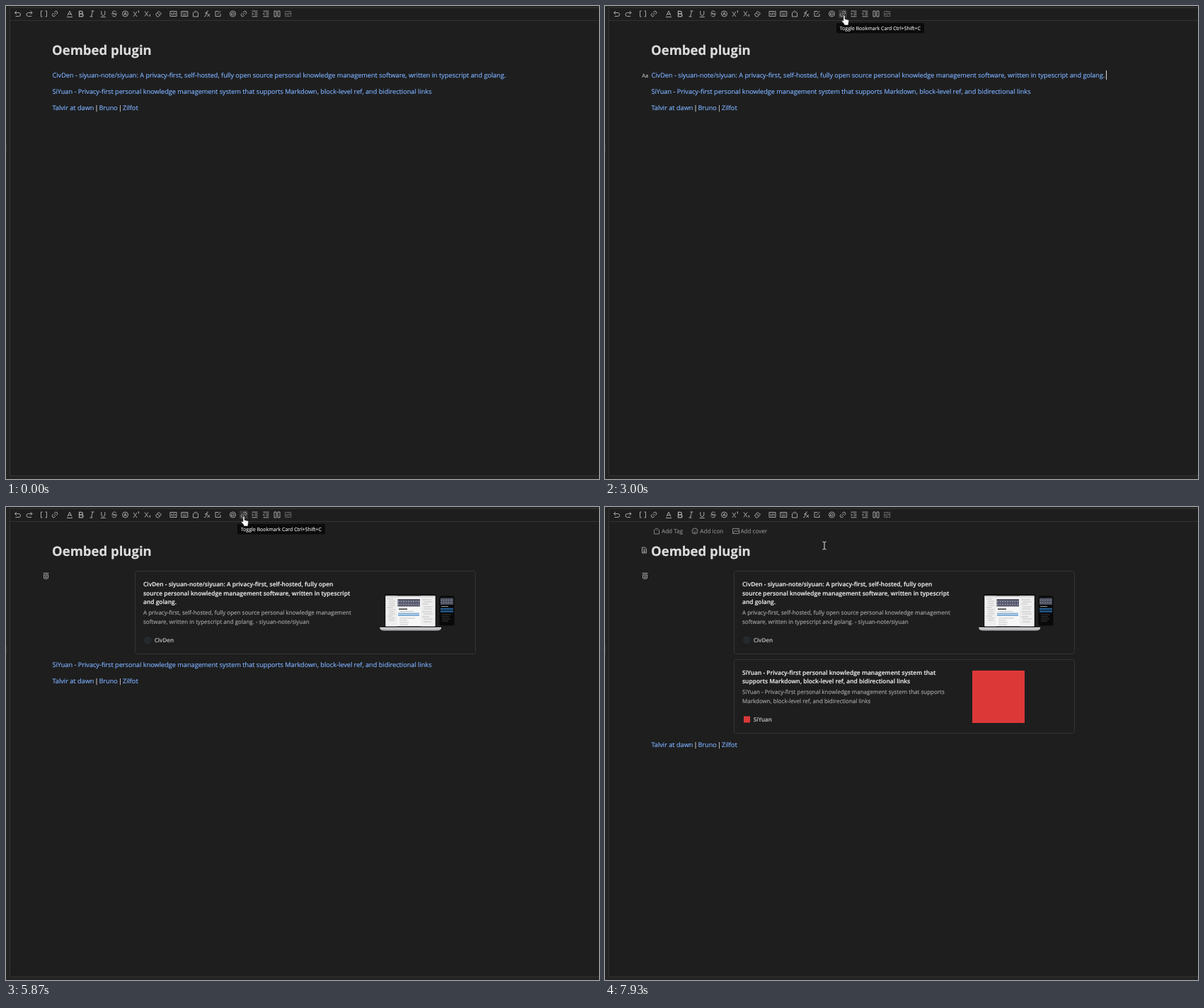
These frames come from a looping animation (838x668 px, 8000 ms). An HTML page:

```html
<!DOCTYPE html>
<html lang="en">
<head>
<meta charset="utf-8">
<title>Oembed plugin</title>
<style>
  html, body { margin: 0; height: 100%; overflow: hidden; background: #1e1e1e; }
  svg { display: block; width: 100vw; height: 100vh; }
  text {
    font-family: "Open Sans", "Noto Sans", sans-serif;
    text-rendering: geometricPrecision;
    fill: currentColor; stroke: currentColor; stroke-width: .16;
  }
  .icon { fill: none; stroke: #acacac; stroke-width: .95; }
  .link { font-size: 9.16px; color: #7db0ff; }
  .link .bar { color: #dcdcdc; }
  .heading { font-size: 8.43px; font-weight: 600; color: #ebebeb; }
  .summary { font-size: 8.03px; color: #a4a4a4; }
  .site { font-size: 8.1px; font-weight: 600; color: #b4b4b4; }
  .add { font-size: 8.15px; color: #888; }
  .add .icon { stroke: #888; }
  .frame { fill: none; stroke: #353535; }
</style>
</head>
<body>
<svg viewBox="0 0 838 668">
  <rect width="838" height="668" fill="#1e1e1e"/>
  <path d="M0 0H838V2H5V668H0zM5 664H838V668H5z" fill="#232323"/>
  <path d="M838 2.5H5.5V663.5H838M6 20.5H838" fill="none" stroke="#333"/>
  <path d="M.5 196v12" stroke="#343434"/>
  <rect id="hover" x="330" y="5" width="12" height="12" rx="1.5" fill="#383838"/>
  <g id="toolbar" class="icon"></g>

  <text x="65" y="69" font-size="18.5" font-weight="700" color="#dcdcdc">Oembed plugin</text>
  <g id="titleTools" class="add">
    <g id="addIcons" class="icon"></g>
    <text x="80" y="37">Add Tag</text>
    <text x="134.3" y="37">Add icon</text>
    <text x="191.4" y="37">Add cover</text>
  </g>

  <text id="link1" class="link" x="65.5" y="101.4">CivDen - siyuan-note/siyuan: A privacy-first, self-hosted, fully open source personal knowledge management software, written in typescript and golang.</text>
  <text id="link2" class="link" x="65.5" y="124.4">SiYuan - Privacy-first personal knowledge management system that supports Markdown, block-level ref, and bidirectional links</text>
  <text id="link3" class="link" x="65.5" y="147.4">Talvir at dawn <tspan class="bar" dx="-1.4">|</tspan> <tspan dx="-1.4">Bruno</tspan> <tspan class="bar" dx="-1.4">|</tspan> <tspan dx="-1.4">Zilfot</tspan></text>

  <g id="card1">
    <rect class="frame" x="182.5" y="90.5" width="481" height="117" rx="3"/>
    <g class="heading">
      <text x="194" y="112">CivDen - siyuan-note/siyuan: A privacy-first, self-hosted, fully open</text>
      <text x="194" y="124.6">source personal knowledge management software, written in typescript</text>
      <text x="194" y="137.2">and golang.</text>
    </g>
    <g class="summary">
      <text x="194" y="152.2">A privacy-first, self-hosted, fully open source personal knowledge management</text>
      <text x="194" y="164.7">software, written in typescript and golang. - siyuan-note/siyuan</text>
    </g>
    <circle cx="200.3" cy="188" r="5.5" fill="#24292e"/>
    <text class="site" x="209.7" y="191">CivDen</text>
    <g id="devices">
      <rect x="535" y="123.5" width="73" height="47" rx="2" fill="#0b0b0b"/>
      <rect x="536.5" y="125.5" width="70" height="43" fill="#f7f7f7"/>
      <path d="M536.5 125.5h16.5v43h-16.5zM586 125.5h20.5v43H586z" fill="#eee"/>
      <path d="M536.5 126.8h70" stroke="#d4d4d4" stroke-width="1.4"/>
      <rect x="553.5" y="130" width="31.5" height="10.5" fill="#55586a"/>
      <path d="M554 133.5h31M554 137.5h31" stroke="#9a9dae" stroke-width="1.4" stroke-dasharray="2 1.5"/>
      <path d="M555 144.2h12" stroke="#333" stroke-width="1.5"/>
      <path d="M554 150.5h30M554 153h30" stroke="#82afd6" stroke-width="2.2"/>
      <path d="M556 147.4h20M556 157h22M556 160h11M556 163h13M556 166h12" stroke="#b0b0b0" stroke-width=".7"/>
      <path d="M539 130h8M541 133h9M541 136h8M541 139h9M539 142h8M541 145h9M541 148h8M541 151h9M539 154h8M541 157h9M541 160h8M588 131h13M590 134h13M588 137h9M590 141h13M590 144h12M588 148h14M590 151h13M588 155h10M590 158h13M590 162h11" stroke="#b4b4b4" stroke-width=".7"/>
      <path d="M528.5 170h86.5v2q-1.5 2.5-6 2.5h-74.5q-5 0-6-2.5z" fill="#b9babd"/>
      <path d="M528.5 170.5h86.5" stroke="#ededed"/>
      <rect x="612.5" y="125.5" width="21" height="42" rx="2.5" fill="#090909"/>
      <rect x="614" y="128.5" width="18" height="9.5" fill="#4c5060"/>
      <path d="M614 131.5h18M614 135h18" stroke="#858998" stroke-width="1.2" stroke-dasharray="2 1.5"/>
      <path d="M615 140.5h10" stroke="#999"/>
      <path d="M614 144h18M614 147.5h18" stroke="#245a8c" stroke-width="2.6"/>
      <path d="M616 152h13M616 155h10M616 158h12M616 161h9" stroke="#555" stroke-width=".7"/>
    </g>
  </g>

  <g id="card2">
    <rect class="frame" x="182.5" y="215.5" width="481" height="104" rx="3"/>
    <g class="heading">
      <text x="194" y="236.8">SiYuan - Privacy-first personal knowledge management system that</text>
      <text x="194" y="249.4">supports Markdown, block-level ref, and bidirectional links</text>
    </g>
    <g class="summary">
      <text x="194" y="264.4">SiYuan - Privacy-first personal knowledge management system that supports</text>
      <text x="194" y="276.9">Markdown, block-level ref, and bidirectional links</text>
    </g>
    <rect x="196" y="295.5" width="9" height="9" fill="#dc3838"/>
    <text class="site" x="209.7" y="303.3">SiYuan</text>
    <rect x="519" y="231" width="74" height="74" fill="#dc3838"/>
  </g>

  <g id="actions1"></g>
  <g id="actions2" transform="translate(0 125)"></g>

  <text id="paragraphMark" x="52.3" y="3.2" font-size="7.5" color="#b8b8b8">Aa</text>
  <path id="blockMark" class="icon" d="M52.5-4h8M53.5-1.8h6v4.8l-3 1.2l-3-1.2zM55 .2h3M55 2h3"/>
  <path id="caret" d="M0 0v13" stroke="#dcdcdc"/>

  <g id="tooltip">
    <rect x="327" y="24" width="124" height="14.5" rx="2" fill="#0b0b0b"/>
    <text x="331.7" y="33.8" font-size="7.02" color="#dedede">Toggle Bookmark Card Ctrl+Shift+C</text>
  </g>

  <path id="beam" fill="none" stroke="#e4e4e4" d="M-2.5-5.5Q0-5.5 0-4Q0-5.5 2.5-5.5M0-4V4M-2.5 5.5Q0 5.5 0 4Q0 5.5 2.5 5.5"/>
  <g id="hand">
    <path transform="translate(1 0) scale(1.08)" d="M-1 .8Q0-.8 1 .8V5L5 6Q6.3 6.3 6.2 7.5L5.5 11V13H0V11.5L-3 8Q-3.3 6.5-2 6.7L-1 7.5z" fill="#fff" stroke="#111" stroke-width=".5"/>
  </g>
</svg>

<script>
const FPS = 15, LOOP = 8000;
const el = id => document.getElementById(id);

const LINK = "M-1-2L.5-3.5a2.2 2.2 0 0 1 3 3L2 1M1 2L-.5 3.5a2.2 2.2 0 0 1-3-3L-2-1M-1.5 1.5l3-3";
const TAG = "M-3.5-1.5L0-4L3.5-1.5V4h-7zM-.5-1.3h1";
const UNDO = "M-4-1.5H1.5a2.5 2.5 0 0 1 0 5H-3M-1.5-4L-4-1.5L-1.5 1";
const BOX = "M-4.5-3.5h9v7h-9z";
const RING = "M-4 0a4 4 0 1 0 8 0a4 4 0 1 0-8 0";
const LINES = "M-4-3.8h8M0-1.2h4M0 1.2h4M-4 3.8h8";

// Each entry: x, path, optional extra attributes.
const toolbar = [
  [16.5, UNDO], [33, UNDO, "flip"],
  [53.5, "M-2-4h-2v8h2M2-4h2v8h-2"], [69, LINK],
  [90, "M-3 2.5L0-4L3 2.5M-2 .5h4M-4 4.5h8"],
  [106, "M-2.5-3.7H.5a1.8 1.8 0 0 1 0 3.7h-3zM-2.5 0H1a1.9 1.9 0 0 1 0 3.8h-3.5z", 'stroke-width="1.3"'],
  [121.5, "M-1-4h4M-3 4h4M1-4l-2 8"],
  [137.3, "M-2.5-4v4a2.5 2.5 0 0 0 5 0v-4M-3.5 4.5h7"],
  [153, "M2.5-2.5C2-4.5-2.5-4.5-2.5-2C-2.5 0 2.5 0 2.5 2C2.5 4.5-2.5 4.5-2.8 2M-4 0h8"],
  [168.5, RING + "M-1.8 2L0-2.3L1.8 2M-1.2 .7h2.4"],
  [184, "M-4-3l5 7M1-3l-5 7M2.5-4l1-.5v3"],
  [200, "M-4-3.5l5 7M1-3.5l-5 7M2.5 1.5l1-.5v3"],
  [215.5, "M-4 1L0-3.5L4-.5L0 4h-2zM-2-1.2l4 3"],
  [236.5, BOX + "M-1.5-1.3L-3 0l1.5 1.3M1.5-1.3L3 0L1.5 1.3M.6-2l-1.2 4"],
  [252.3, BOX + "M-3-1.2h1.5M-.7-1.2H.7M1.5-1.2H3M-2.5 1.3h5"],
  [268, TAG],
  [284, "M2-4Q0-4.5-.5-2L-1.5 2Q-2 4.5-4 3.5M-3-1.2h4M.5 0L4 4M4 0L.5 4"],
  [299.5, "M1-3.5h-4.5v7h7V0M-1 1L4-4"],
  [320.5, RING + "M-1.8 0a1.8 1.8 0 1 0 3.6 0a1.8 1.8 0 1 0-3.6 0v1.8"],
  [336, LINK],
  [351.5, LINES + "M-4-1.5l2 1.5l-2 1.5"],
  [367.5, LINES + "M-2-1.5l-2 1.5l2 1.5"],
  [383, "M-4-4h3v8h-3zM1-4h3v8h-3z"],
  [398.7, "M-4-3.5h8v7h-8zM-4 0h8M0-3.5v2M0 1.5v2M-2 0v2M2-2v2", 'opacity=".5"']
];
const icon = (x, y, d, extra = "") =>
  `<path transform="translate(${x} ${y})${extra === "flip" ? " scale(-1 1)" : ""}" d="${d}" ${extra === "flip" ? "" : extra}/>`;

el("toolbar").innerHTML = toolbar.map(([x, d, extra]) => icon(x, 11, d, extra)).join("");
el("addIcons").innerHTML =
  icon(73, 34, TAG) +
  icon(127, 34, RING + "M-2 1q2 2.5 4 0M-1.5-1.5v.8M1.5-1.5v.8") +
  icon(185, 34, BOX + "M-4 3l3-4l2 2l1.5-1.5l2 2M1.5-1.8h1") +
  icon(55.5, 61, "M-3-4h4L3-2v6h-6zM-1.5-1h3M-1.5 1h3M-1.5 2.6h3", 'stroke="#acacac"');
el("actions1").innerHTML = el("actions2").innerHTML =
  `<rect x="751" y="90" width="28.5" height="14" rx="3" fill="#3a3a3a"/>
   <path class="icon" style="stroke:#171717" d="M755 100l.5-2l4.5-4.5l1.5 1.5l-4.5 4.5zM754 101.5h8"/>
   <path d="M768 97h9" stroke="#171717" stroke-width="1.3" stroke-dasharray="1.3 2.4"/>`;

// Pointer stops: step, x, y.
const pointerPath = [
  [3, 832, 655], [7, 796, 400], [11, 742, 180], [15, 715, 123],
  [22, 725, 100], [31, 725, 100], [36, 448, 55.5], [40, 362, 32], [44, 337, 13],
  [61, 337, 13], [64, 440, 105], [67, 568, 190], [70, 618, 225],
  [75, 618, 225], [77, 559, 168], [81, 430, 95], [85, 350, 35], [88, 335, 13],
  [98, 335, 13], [101, 229, 307], [104, 205, 346], [111, 195, 337],
  [114, 195, 337], [119, 310, 54.5]
];
// Gutter marks: first step, y, whether it marks a whole block.
const gutter = [
  [13, 121], [19, 98], [63, 97.5, true], [69, 223], [79, 97.5, true],
  [100, 222.5, true], [103, 335], [116, 222.5, true], [117, 97.5, true]
];
// Caret spans: first step, end step, x, y.
const caretSpans = [
  [27, 35, 708.5, 91], [45, 61, 708.5, 91], [74, 82, 603, 216]
];

const within = (n, ...spans) => spans.some(([from, to]) => n >= from && n < to);
const show = (id, on) => el(id).style.display = on ? "" : "none";
const move = (id, x, y) => el(id).setAttribute("transform", `translate(${x} ${y})`);

function pointerAt(n) {
  const i = pointerPath.findIndex(p => p[0] > n);
  if (i < 0) return pointerPath.at(-1).slice(1);
  const [a, ax, ay] = pointerPath[i - 1], [b, bx, by] = pointerPath[i];
  const k = (n - a) / (b - a);
  return [ax + (bx - ax) * k, ay + (by - ay) * k];
}

function fade(id, n, from, to) {
  el(id).setAttribute("opacity", Math.max(0, Math.min(1, (n - from + 1) / 2, (to - n) / 2)));
}

function drawPointer(n, hasCard1, hasCard2) {
  const visible = n >= 3;
  const [x, y] = visible ? pointerAt(n) : [0, 0];
  const overCard = x > 182 && x < 664 &&
    (hasCard1 && y > 90 && y < 208 || hasCard2 && y > 215 && y < 320);
  const isHand = y < 21 || overCard;
  show("hand", visible && isHand);
  show("beam", visible && !isHand);
  move(isHand ? "hand" : "beam", x, y);
}

function draw(n) {
  const hasCard1 = n >= 61, hasCard2 = n >= 94;
  show("link1", !hasCard1);
  show("card1", hasCard1);
  show("link2", !hasCard2);
  show("card2", hasCard2);
  move("link2", 0, hasCard1 ? 102 : 0);
  move("link3", 0, hasCard2 ? 191.3 : hasCard1 ? 102 : 0);

  show("titleTools", within(n, [34, 42], [83, 87], [118, 120]));
  const overButton = within(n, [43, 62], [87, 99]);
  show("tooltip", overButton);
  show("hover", overButton);

  fade("actions1", n, n < 75 ? 63 : n < 90 ? 78 : 99, n < 75 ? 69 : n < 90 ? 84 : 103);
  fade("actions2", n, n < 110 ? 100 : 115, n < 110 ? 105 : 118);

  const mark = gutter.findLast(([from]) => n >= from);
  show("paragraphMark", mark && !mark[2]);
  show("blockMark", mark && mark[2]);
  if (mark) move(mark[2] ? "blockMark" : "paragraphMark", 0, mark[1]);

  const caret = caretSpans.find(([from, to]) => within(n, [from, to]));
  show("caret", caret);
  if (caret) move("caret", caret[2], caret[3]);

  drawPointer(n, hasCard1, hasCard2);
}

const start = performance.now();
function tick() {
  const time = (performance.now() - start) % LOOP;
  draw(Math.floor((time + 4) * FPS / 1000) % (LOOP * FPS / 1000));
  requestAnimationFrame(tick);
}
tick();
</script>
</body>
</html>
```
